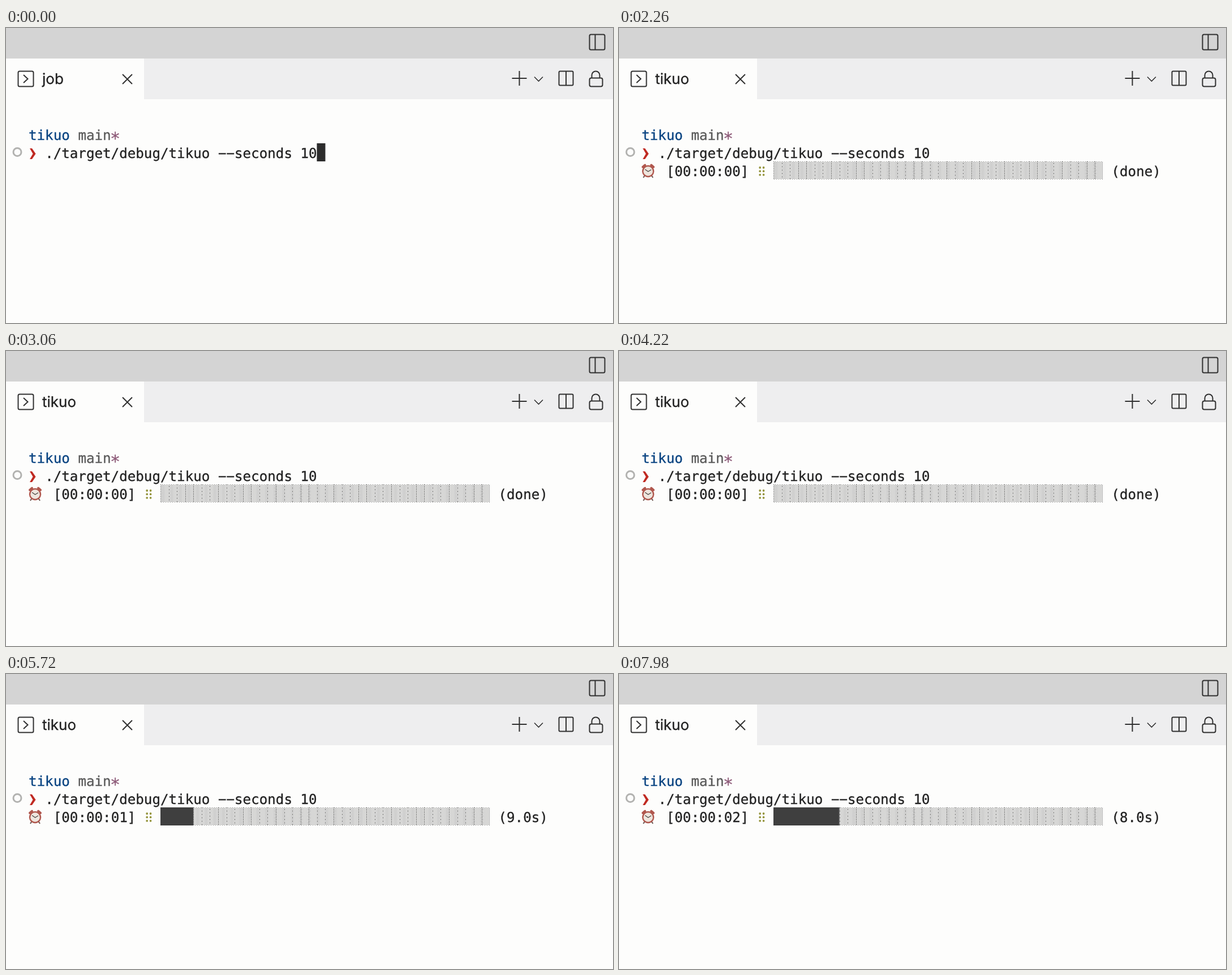
Write an HTML page that moves like this. It is 1073 px wide and 522 px high and loops after 8000 ms.

```html
<!DOCTYPE html>
<html lang="en">
<head>
<meta charset="utf-8">
<title>Terminal timer</title>
<style>
  html, body { margin: 0; width: 100%; height: 100%; overflow: hidden; background: #fdfdfc; }
  svg { display: block; width: 1073px; height: 522px; color: #222; }
  text { font: 24.2px "DejaVu Sans Mono", monospace; text-rendering: geometricPrecision; white-space: pre; }
  text, tspan { fill: currentColor; stroke: currentColor; stroke-width: .35; }
  #title { font: 26px Inter, "Open Sans", sans-serif; }
  .icon { fill: none; stroke: #303030; stroke-width: 2; }
</style>
</head>
<body>
<svg viewBox="0 0 1073 522">
  <defs>
    <pattern id="shade" width="4" height="2" patternUnits="userSpaceOnUse">
      <path d="M0 0h1v1h-1zM2 1h1v1h-1z" fill="#626260"/>
    </pattern>
  </defs>

  <rect width="1073" height="54" fill="#d4d4d4"/>
  <rect x="244" y="54" width="829" height="72" fill="#eeeeef"/>

  <g class="icon">
    <rect x="1031.5" y="11.5" width="27" height="27" rx="2.5"/>
    <path d="M1041.5 11.5v27"/>
    <rect x="21.5" y="76.5" width="27" height="27" rx="2.5"/>
    <path d="M31 83l7.5 7-7.5 7M206 82l17 17M223 82l-17 17"/>
    <path d="M894.5 89h26M907.5 76v26"/>
    <path d="M934 86.5l7.5 7.5 7.5-7.5" stroke-width="1.6"/>
    <rect x="977.5" y="76.5" width="25" height="25" rx="2"/>
    <path d="M990 76.5v25"/>
    <rect x="1031.5" y="88.5" width="23" height="15" rx="3"/>
    <path d="M1035.5 88.5v-5a7 7 0 0 1 14 0v5"/>
  </g>
  <text id="title" x="64" y="99"></text>

  <text x="40" y="198"><tspan color="#0a4482">tikuo</tspan> <tspan color="#5a5a5a">main</tspan><tspan color="#8d5a78" font-size="30" dx="-1.7" dy="7.5">*</tspan></text>
  <circle cx="20" cy="219.5" r="7" fill="none" stroke="#b2b2b0" stroke-width="3"/>
  <path d="M42 213h4l6.500 9.500-6.500 9.500h-4l5.500-9.500z" fill="#c02a22"/>
  <text x="69.14" y="230">./target/debug/tikuo −−seconds 10</text>
  <rect id="cursor" width="15" height="32" fill="#2c2c2c"/>

  <g id="progress">
    <g stroke-linecap="round">
      <path d="M45.5 261l-2 3M57.5 261l2 3" stroke="#6f5b56" stroke-width="2.2"/>
      <path d="M42 246l4-3.5M61 246l-4-3.5" stroke="#b0574d" stroke-width="4"/>
      <circle cx="51.5" cy="253.500" r="9.500" fill="#eee5dd" stroke="#b0574d" stroke-width="2.4"/>
      <path d="M46.500 250.500l5 3.500 5-3" fill="none" stroke="#4a4643" stroke-width="1.3"/>
    </g>
    <text id="elapsed" x="83.71" y="262"></text>
    <path d="M249.2 247v13M255.6 247v13" stroke="#94943c" stroke-width="3.8"
          stroke-linecap="round" stroke-dasharray="0 6.4"/>
    <rect x="273" y="236" width="583" height="32" fill="url(#shade)"/>
    <path id="cells" stroke="#484848" stroke-dasharray="1 2"/>
    <rect id="bar" x="273" y="236" height="32" fill="#3f3f3f"/>
    <text id="left" x="870.5" y="262"></text>
  </g>
</svg>
<script>
  const LOOP = 8000, ENTER = 1840, START = 2000, RENAME = 2160, SECOND = 2420, CELL = 14.57;
  const el = id => document.getElementById(id);
  const show = (id, on) => el(id).setAttribute("visibility", on ? "visible" : "hidden");

  el("cells").setAttribute("d", Array.from({ length: 40 },
    (_, i) => `M${Math.round(273 + i * CELL) + .5} 236v32`).join(""));

  function draw(t) {
    const entered = t >= ENTER, running = t >= START;
    const secs = Math.max(0, Math.floor((t - START) / SECOND));

    el("title").textContent = t < RENAME ? "job" : "tikuo";
    el("cursor").setAttribute("x", entered ? 39.5 : 549.5);
    el("cursor").setAttribute("y", entered ? 236 : 204);
    show("cursor", !running);
    show("progress", running);
    el("elapsed").textContent = `[00:00:0${secs}]`;
    el("bar").setAttribute("width", secs * 4 * CELL);
    el("left").textContent = secs ? `(${(10 - secs).toFixed(1)}s)` : "(done)";
  }

  const begin = performance.now();
  function tick() {
    draw((performance.now() - begin) % LOOP);
    requestAnimationFrame(tick);
  }
  tick();
</script>
</body>
</html>
```
